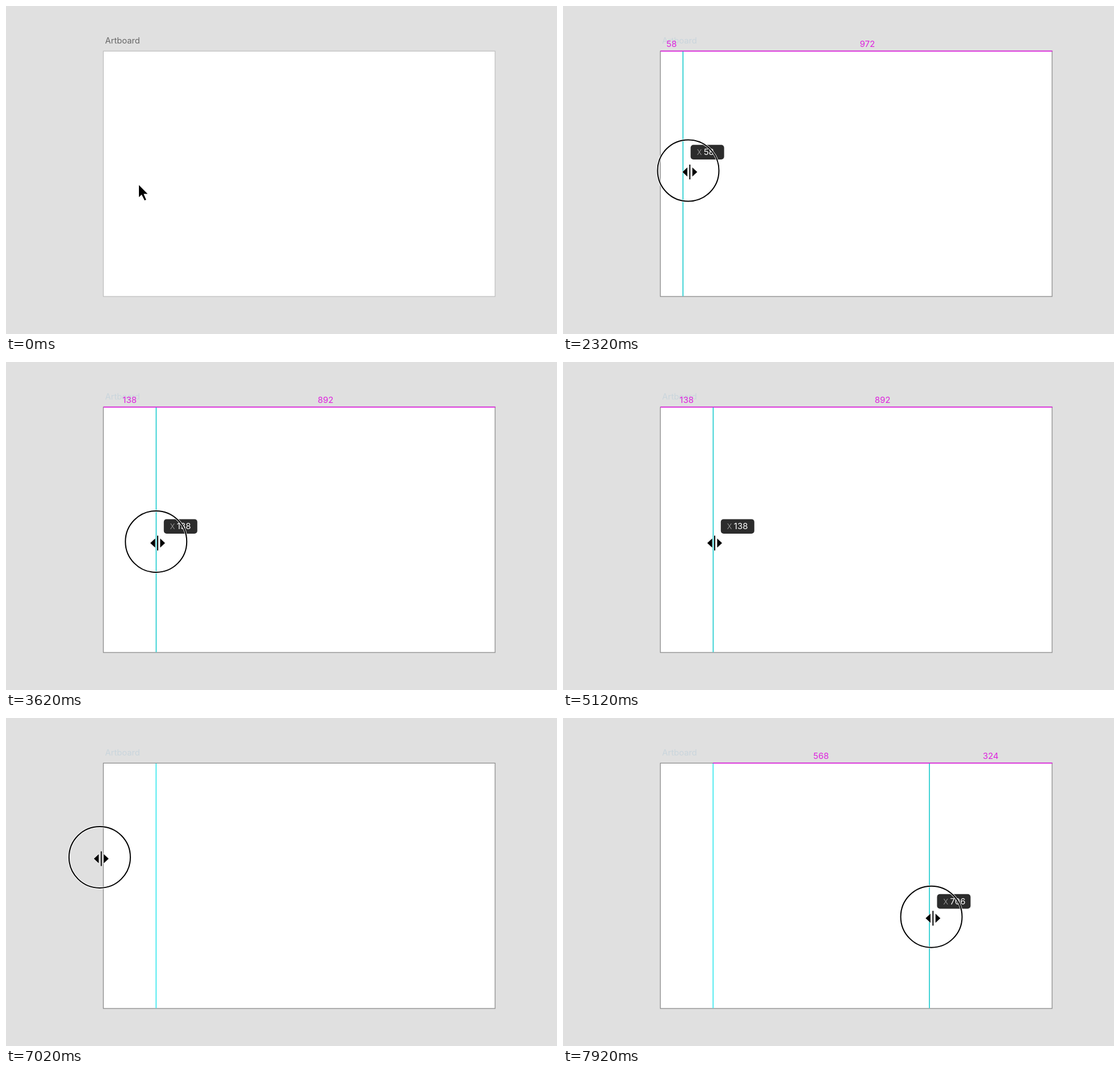
Animation of 970x577 px, one loop 8000 ms. Source, as an HTML page:

```html
<!DOCTYPE html>
<html lang="en">
<head>
<meta charset="utf-8">
<style>
  html, body { margin: 0; width: 100%; height: 100%; overflow: hidden; background: #e0e0e0; }
  svg { display: block; width: 970px; height: 577px; }
  text { font-family: Inter, Roboto, sans-serif; font-size: 15px; }
  .size { fill: #de22de; text-anchor: middle; }
</style>
</head>
<body>
<svg viewBox="0 0 970 577">
  <rect id="strip" x="156" y="80" width="15" height="431" fill="#ebebeb"/>
  <text id="title" x="174.6" y="65.5" style="font-size:14.7px">Artboard</text>
  <rect id="board" x="171.4" y="79.4" width="689.6" height="431.6" fill="#fff" stroke-width="1.3"/>
  <line id="placed" y1="80" y2="510.5" stroke="#3ae8ee" stroke-width="1.7"/>
  <g id="measure">
    <line id="span" x2="861.6" y1="79.3" y2="79.3" stroke="#de22de" stroke-width="1.8"/>
    <line id="guide" y1="80" y2="510.5" stroke="#22cccf" stroke-width="1.7"/>
    <text id="before" class="size" y="72.3"></text>
    <text id="after" class="size" y="72.3"></text>
    <g id="tip">
      <rect width="59" height="25.6" rx="5" fill="#2c2c2c"/>
      <text x="11" y="18" fill="#a8a8a8" style="font-size:13px;font-weight:300">X</text>
      <text id="value" x="23" y="18" fill="#fff"></text>
    </g>
  </g>
  <g id="ring" fill="none">
    <circle r="54" stroke="#fff" stroke-opacity=".8" stroke-width="4"/>
    <circle r="54" stroke="#000" stroke-width="2"/>
  </g>
  <g id="pointer" stroke="#fff" stroke-opacity=".7" stroke-width="1.4" paint-order="stroke">
    <path id="arrow" d="M0 0V21.2L4.8 16.8L10 27L12.7 25.7L8.3 15.6H15.3Z"/>
    <path id="resize" d="M-13 0L-4.4 -8V8ZM13 0L4.4 -8V8ZM-1 -13H1V13H-1Z"/>
  </g>
</svg>
<script>
const LOOP = 8000, LAG = 85;
const LEFT = 171.4, RIGHT = 861, SCALE = 0.67, WIDTH = 1030, FIRST = 138;

// Each move starts where the previous one ended.
const home = { x: 234, y: 315 };
const moves = [
  { start: 0, time: 620, x: 172, y: 261, rise: 1.7, settle: 2.5 },
  { start: 1920, time: 1700, x: 267, y: 318.4, rise: 1.1, settle: 3.41 },
  { start: 5120, time: 1100, x: 166, y: 247, rise: 1.7, settle: 2.8 },
  { start: 7005, time: 1220, x: 652.6, y: 352.3, rise: 1.7, settle: 6.265, lead: 1.2 }
];

const $ = id => document.getElementById(id);
const show = (id, on) => $(id).setAttribute('display', on ? 'inline' : 'none');
const set = (id, attrs) => { for (const k in attrs) $(id).setAttribute(k, attrs[k]); };
const place = (id, x, y) => set(id, { transform: `translate(${x} ${y})` });
const within = (t, from, to) => t >= from && t < to;
const toX = units => LEFT + units * SCALE;
const ease = (u, rise, settle) => 1 - (1 - u ** rise) ** settle;

function pointerAt(t) {
  let { x, y } = home;
  for (const m of moves) {
    const u = Math.min(Math.max((t - m.start) / m.time, 0), 1);
    x += (m.x - x) * ease(u, m.rise, m.settle);
    y += (m.y - y) * ease(u, m.rise, m.settle * (m.lead || 1));
  }
  return [x, y];
}

function label(id, from, to, units) {
  set(id, { x: (from + to) / 2 });
  $(id).textContent = units;
}

function drawLine(id, x) {
  set(id, { x1: x + 0.4, x2: x + 0.4 });
}

function render(ms) {
  const t = ms < 20 ? 0 : 20 + Math.floor((ms - 20) / 100) * 100;
  const [x, y] = pointerAt(t);
  const [lagX, lagY] = pointerAt(t - LAG);
  const pressed = within(t, 1620, 5120) || t >= 6820;
  const active = within(t, 1720, 5220) || t >= 6920;
  const second = t >= 5220;

  show('strip', t === 1620 || t === 6820);
  set('title', { fill: active ? '#c9d5dc' : '#666' });
  set('board', { stroke: active ? '#8c8c8c' : '#c0c0c0' });

  // The guide and its labels trail the pointer slightly.
  const guideX = lagX - 3;
  const units = Math.floor((guideX - LEFT) / SCALE);
  const base = second ? FIRST : 0;
  show('placed', second);
  drawLine('placed', toX(FIRST));
  show('measure', active && guideX >= LEFT);
  drawLine('guide', guideX);
  set('span', { x1: Math.min(toX(base), guideX) });
  label('before', toX(base), guideX, Math.abs(units - base));
  label('after', guideX, RIGHT, WIDTH - units);
  place('tip', guideX + 13.8, lagY - 42);
  $('value').textContent = units;

  show('ring', pressed);
  place('ring', x - 2.8, y - 2.5);

  const overGuide = t >= 5120 && Math.abs(x - toX(FIRST)) < 12;
  const resizing = pressed || x < 181 || overGuide;
  show('resize', resizing);
  show('arrow', !resizing);
  place('pointer', x, y);
}

function tick() {
  render(performance.now() % LOOP);
  requestAnimationFrame(tick);
}
tick();
</script>
</body>
</html>
```
